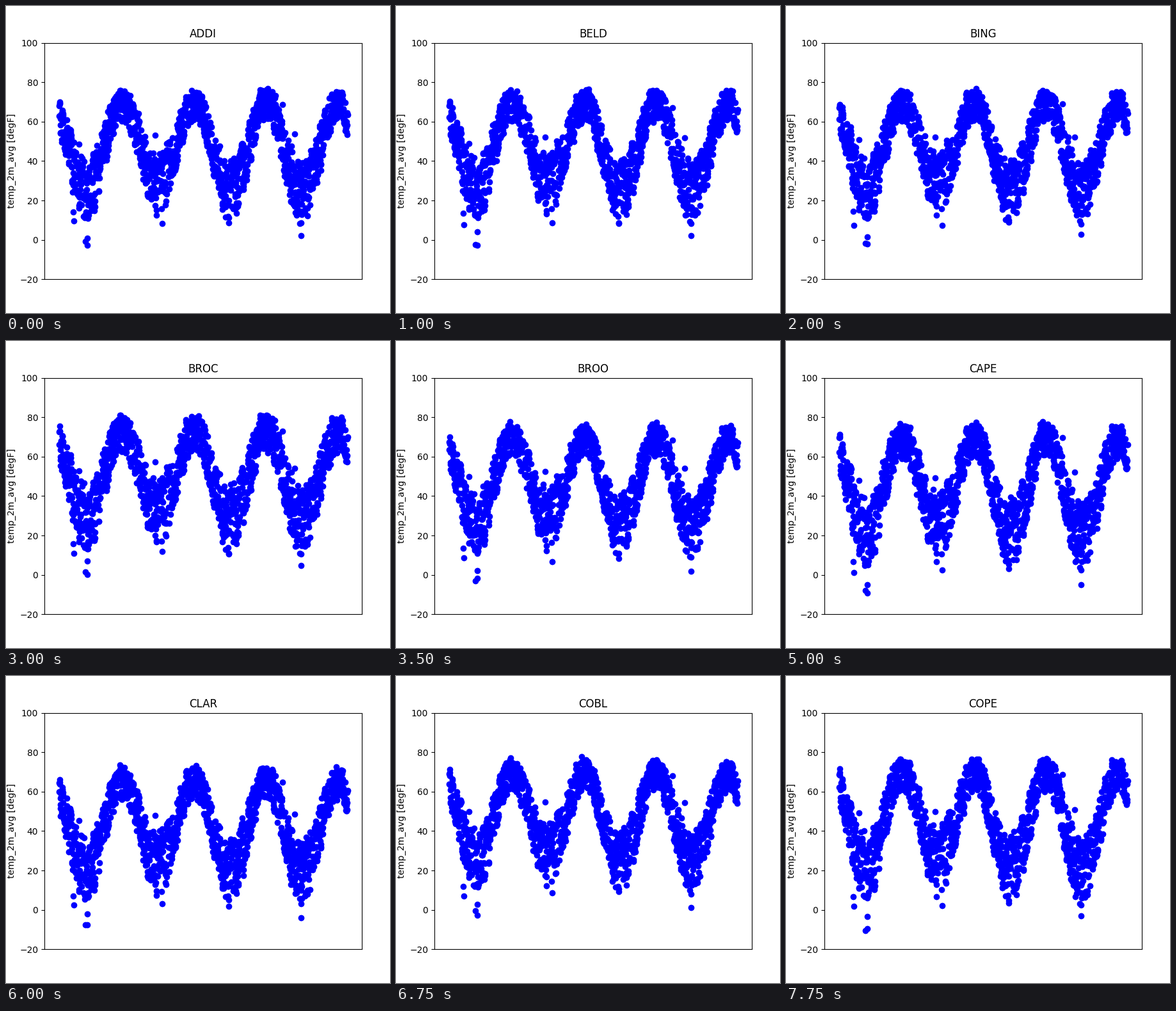
Animation of 600 by 480 pixels, one loop 8000 ms. Source, as a matplotlib script:

```python
import matplotlib.pyplot as plt
import numpy as np
from matplotlib.animation import FuncAnimation

W, H, DPI = 600, 480, 100
STEP_MS = 250

X0, X1, DAYS = 83, 533.5, 1461  # record from first to last day, in px
PEAK, YEAR = 181.5, 112.3       # first midsummer and length of a year, in px

STATIONS = ("ADDI ANDE BATA BEAC BELD BELL BELM BERK BING BKLN BRAN BREW "
            "BROC BRON BROO BSPA BUFF BURD BURT CAMD CAPE CHAZ CHES CINC "
            "CLAR CLIF CLYM COBL COHO COLD COPA COPE").split()

# Climate groups: degF offset on the coldest and on the warmest days
CLIMATES = [
    ("BEAC BKLN BROC BRON", (3, 4)),
    ("ANDE BELM CHES CLAR CLIF", (-6, -3.5)),
    ("BELL BSPA CAPE CHAZ COPA COPE", (-7, 1)),
]

# A few heat and cold snaps: (x, degF)
SNAPS = np.array([
    (105, 13), (105.5, 8), (114, 49), (124, -2), (127, -2), (126.5, 3),
    (233, 53), (235, 12), (244, 8), (432, 68), (451, 53), (461, 2)])


def base_record():
    """Weather shared by all stations: x in px, temperature in degF."""
    rng = np.random.default_rng(12)
    x = np.linspace(X0, X1, DAYS)
    season = np.cos(2 * np.pi * (x - PEAK) / YEAR)
    z, noise = 0, []
    for kick in rng.normal(size=DAYS):
        z = 0.5 * z + 0.87 * kick
        noise.append(z)
    winters = PEAK + YEAR * (np.arange(4) - 0.5)
    winter_bias = np.interp(x, winters, [0, 3, -1, -2]) * (1 - season) / 2
    spread = 12 - 4 * season
    temp = 47 + 21.5 * season + winter_bias
    temp += spread * np.tanh(0.8 * np.array(noise))
    return np.append(x, SNAPS[:, 0]), np.append(temp, SNAPS[:, 1])


BASE_X, BASE_T = base_record()


def climate(name):
    for members, offsets in CLIMATES:
        if name in members:
            return offsets
    return 0, 0.5


def station_temps(i):
    noise = np.random.default_rng(i).normal(0, 0.9, BASE_T.size)
    offset = np.interp(BASE_T, [0, 70], climate(STATIONS[i]))
    return BASE_T + offset + noise


fig = plt.figure(figsize=(W / DPI, H / DPI), dpi=DPI)
ax = fig.add_axes([60 / W, 0.11, 496 / W, 0.77])
ax.set_xlim(60, 556)
ax.set_ylim(-20, 100)
ax.set_xticks([])
ax.set_ylabel("temp_2m_avg [degF]")
title = ax.set_title("")
dots, = ax.plot([], [], "bo")


def draw(i):
    title.set_text(STATIONS[i])
    dots.set_data(BASE_X, station_temps(i))
    return dots, title


anim = FuncAnimation(fig, draw, frames=len(STATIONS), interval=STEP_MS,
                     init_func=lambda: draw(0), repeat=True)
plt.show()
```
